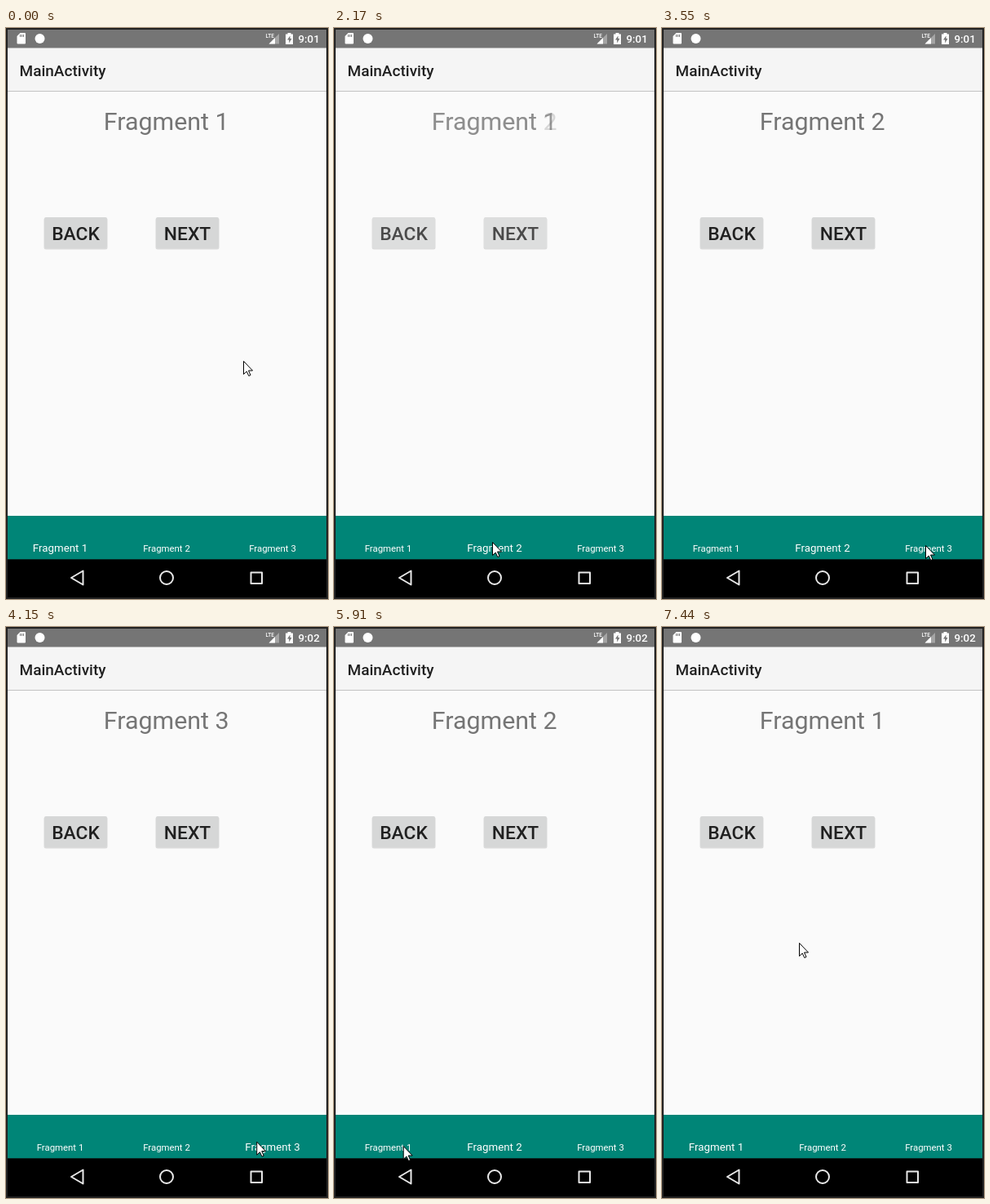
Recreate the animation shown at these times as an HTML page. Size 395 by 700 pixels, loop 7.95 s.

```html
<!DOCTYPE html>
<html lang="en">
<head>
<meta charset="utf-8">
<title>Fragment navigation</title>
<style>
  html, body { margin: 0; width: 100%; height: 100%; overflow: hidden; background: #222; }
  svg { display: block; width: 395px; height: 700px; font-family: Roboto, sans-serif; }
  .medium { font-weight: 500; }
  .middle { text-anchor: middle; }
  .title { font-size: 30.4px; fill: #757575; }
  .button { font-size: 22.8px; fill: #202020; }
  .label { fill: #fff; }
  .outline { fill: none; stroke: #e8e8e8; stroke-width: 2; stroke-linejoin: round; }
</style>
</head>
<body>
<svg viewBox="0 0 395 700">
  <defs>
    <g id="buttons">
      <g fill="#000" opacity=".12">
        <rect x="46.5" y="232.5" width="78" height="39" rx="2.5"/>
        <rect x="183.5" y="232.5" width="78" height="39" rx="2.5"/>
      </g>
      <g fill="#d6d7d7">
        <rect x="47" y="232" width="77" height="38" rx="2"/>
        <rect x="184" y="232" width="77" height="38" rx="2"/>
      </g>
      <g class="button medium middle">
        <text x="85.5" y="259.5">BACK</text>
        <text x="222.5" y="259.5">NEXT</text>
      </g>
    </g>
  </defs>

  <rect width="395" height="700" fill="#222"/>
  <rect x="2" y="2" width="391" height="23" fill="#757575"/>
  <rect x="2" y="24.5" width="391" height="53" fill="#f5f5f5"/>
  <rect x="2" y="77.5" width="391" height="521" fill="#fafafa"/>
  <rect x="2" y="595" width="391" height="3" fill="#fff"/>
  <rect x="2" y="598" width="391" height="53.5" fill="#008577"/>
  <rect x="2" y="651.5" width="391" height="46.5" fill="#000"/>

  <!-- status bar -->
  <g fill="#fff">
    <path d="M17.5 6H23q1 0 1 1V18.5q0 1-1 1H14.500q-1 0-1-1V10Z"/>
    <path d="M17.500 8v3M19.500 8v3M21.500 8v3" stroke="#757575"/>
    <circle cx="41.500" cy="13" r="6"/>
    <text class="medium" x="318.500" y="12" font-size="6.500">LTE</text>
    <path d="M335 7V19.500H322.500Z" opacity=".35"/>
    <path d="M330 12V19.500H322.500Z"/>
    <path d="M345.500 6h4v1.500h2.500V20h-9V7.500h2.500Z"/>
    <path d="M348.500 9.500L345 14.500h2.200V18.500L350.500 13h-2Z" fill="#757575"/>
    <text id="clock" class="medium" x="358.500" y="18" font-size="13.300"></text>
  </g>
  <text class="medium" x="16.500" y="58.500" font-size="19" fill="#202020">MainActivity</text>

  <g id="outgoing"><text class="title middle" x="196.700" y="125"></text><use href="#buttons"/></g>
  <g id="incoming"><text class="title middle" x="196.700" y="125"></text><use href="#buttons"/></g>

  <g class="middle">
    <text class="label" x="66.500" y="641.500">Fragment 1</text>
    <text class="label" x="197" y="641.500">Fragment 2</text>
    <text class="label" x="327" y="641.500">Fragment 3</text>
  </g>

  <!-- system navigation -->
  <path class="outline" d="M94.500 665.500V682.500L80 674Z"/>
  <circle class="outline" cx="197" cy="674" r="8"/>
  <rect class="outline" x="300.500" y="667.500" width="13.500" height="13.500"/>

  <path id="cursor" d="M.5 .5V16.500L4.200 13 6.800 18.500 9 17.500 6.500 12H11.500Z" fill="#fff" stroke="#000"/>
  <circle id="highlight" r="12" fill="#ffeb00" fill-opacity=".55"/>
</svg>
<script>
  const LOOP = 7950;
  const CLOCK_TICK = 3800;
  const FIRST_PAGE = 1;

  // Each move follows a quadratic curve and slows toward its end.
  const moves = [
    { start: 360, end: 770, from: [291, 408], bend: [250, 424], to: [175, 374], power: 2 },
    { start: 1100, end: 1790, from: [175, 374], bend: [34, 648], to: [194, 630], power: 2 },
    { start: 2760, end: 3220, from: [194, 630], bend: [257, 620], to: [320, 632], power: 2 },
    { start: 3370, end: 3550, from: [320, 632], bend: [322, 633], to: [323, 634], power: 2 },
    { start: 4120, end: 4630, from: [323, 634], bend: [256, 618], to: [190, 634], power: 2 },
    { start: 5600, end: 6140, from: [190, 634], bend: [133, 636], to: [76, 636], power: 3 },
    { start: 7030, end: 7440, from: [76, 636], bend: [105, 480], to: [168, 387], power: 2 }
  ];

  const clicks = [
    { press: 1940, fade: 2090, end: 2400, page: 2 },
    { press: 3600, fade: 3700, end: 3970, page: 3 },
    { press: 4990, fade: 5140, end: 5450, page: 2 },
    { press: 6420, fade: 6570, end: 6880, page: 1 }
  ];

  const byId = id => document.getElementById(id);
  const clock = byId('clock');
  const cursor = byId('cursor');
  const highlight = byId('highlight');
  const outgoing = byId('outgoing');
  const incoming = byId('incoming');
  const labels = document.querySelectorAll('.label');

  const progress = (time, start, end) =>
    Math.min(1, Math.max(0, (time - start) / (end - start)));

  function cursorAt(time) {
    const move = moves.filter(m => m.start <= time).pop() || moves[0];
    const u = 1 - (1 - progress(time, move.start, move.end)) ** move.power;
    return move.from.map((a, i) =>
      a * (1 - u) ** 2 + 2 * move.bend[i] * u * (1 - u) + move.to[i] * u ** 2);
  }

  function showPage(group, page, opacity) {
    group.firstElementChild.textContent = `Fragment ${page}`;
    group.setAttribute('opacity', opacity);
  }

  function draw(time) {
    const position = `translate(${cursorAt(time).join(' ')})`;
    cursor.setAttribute('transform', position);
    highlight.setAttribute('transform', position);
    const pressed = clicks.some(c => time >= c.press && time < c.fade);
    highlight.setAttribute('visibility', pressed ? 'visible' : 'hidden');

    const visited = clicks.filter(c => c.fade <= time);
    const latest = visited[visited.length - 1];
    const previous = visited[visited.length - 2];
    const page = latest ? latest.page : FIRST_PAGE;
    const shown = latest ? progress(time, latest.fade, latest.end) : 1;
    showPage(outgoing, previous ? previous.page : FIRST_PAGE, 1 - shown);
    showPage(incoming, page, shown);

    labels.forEach((label, i) =>
      label.setAttribute('font-size', i + 1 === page ? 13.3 : 11.4));
    clock.textContent = time < CLOCK_TICK ? '9:01' : '9:02';
  }

  const origin = performance.now();
  function tick() {
    draw((performance.now() - origin) % LOOP);
    requestAnimationFrame(tick);
  }
  tick();
</script>
</body>
</html>
```
